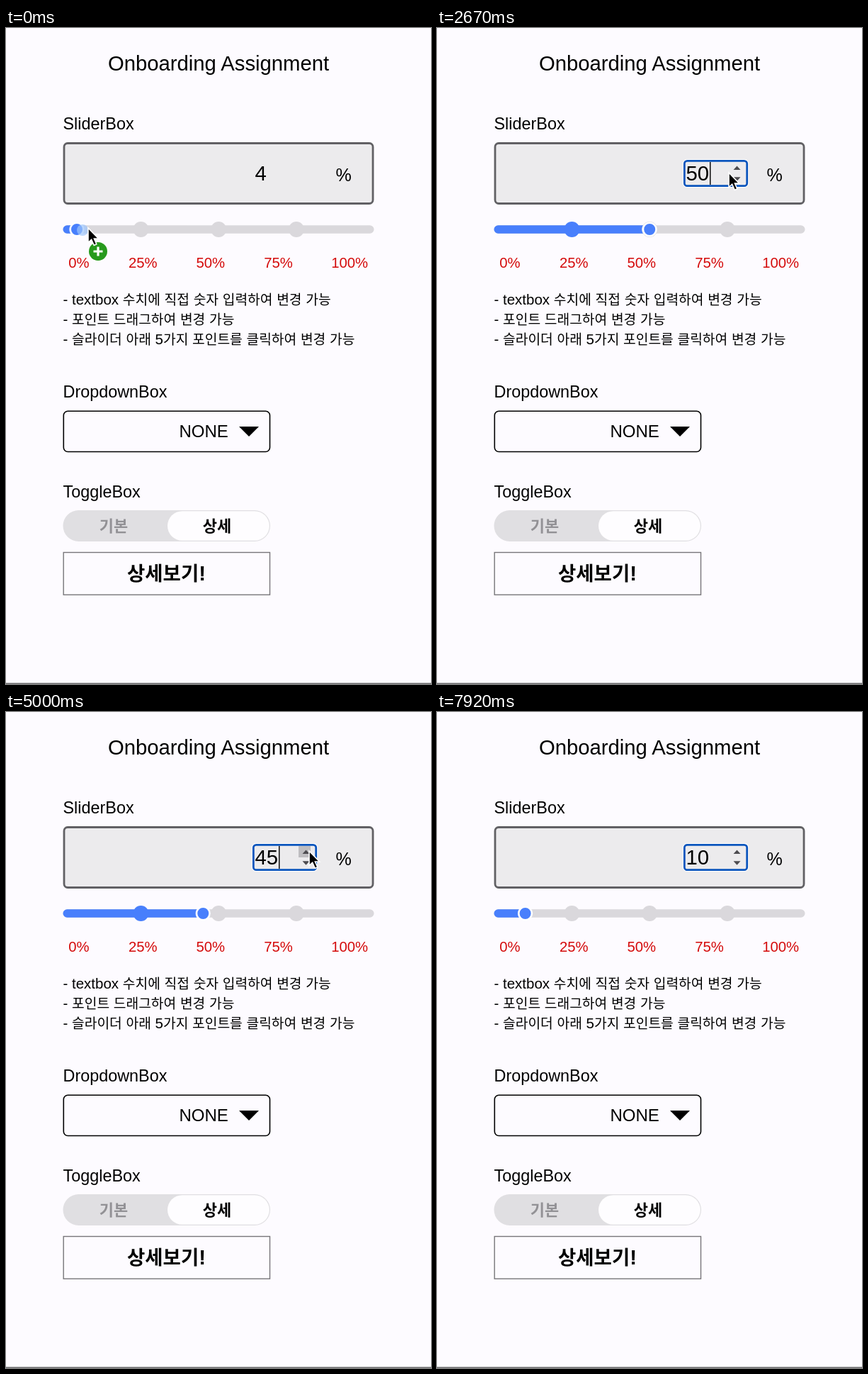
An HTML page that plays this animation: 600 px wide and 925 px high, repeating every 8000 ms.

```html
<!DOCTYPE html>
<html lang="ko">
<head>
<meta charset="utf-8">
<title>Onboarding Assignment</title>
<style>
html, body { margin: 0; width: 100%; height: 100%; overflow: hidden; background: #fdfbff; }
svg { display: block; width: 100vw; height: 100vh; }
text { font-family: "Liberation Sans", Arial, "Noto Sans CJK KR", "Noto Sans CJK", sans-serif; white-space: pre; }
.ko { font-size: .9385em; }
.bold { font-weight: 700; }
.mid { text-anchor: middle; }
</style>
</head>
<body>
<svg viewBox="0 0 600 925">
  <g id="page"></g>

  <g id="focus">
    <rect x="347" y="185" width="93" height="40" rx="6" fill="#fff"/>
    <rect x="349.3" y="187.3" width="88.4" height="35.4" rx="4" fill="#ecebed" stroke="#0b55bd" stroke-width="2.8"/>
    <rect id="press" x="413" width="17" height="16" fill="#bebdc0"/>
    <path d="M418.5 200h10l-5-5.5zM418.5 210.3h10l-5 5.5z" fill="#4d4c50"/>
    <rect id="caret" y="189" width="1.4" height="32" fill="#000"/>
  </g>
  <text id="value" x="351.5" y="215" font-size="29.26"></text>

  <g id="slider">
    <rect x="80.5" y="278.2" width="439" height="11.6" rx="5.8" fill="#dad8dc"/>
    <rect id="bar" x="80.5" y="278.2" height="11.6" rx="5.8" fill="#487ffc"/>
    <g id="dots"></g>
    <circle id="knob" cy="284" r="9.3" fill="#487ffc" stroke="#fff" stroke-width="2.6"/>
  </g>
  <g id="labels"></g>

  <g id="drag">
    <circle cx="-8" cy="3" r="8" fill="#9cc4fb" opacity=".7"/>
    <circle cx="14" cy="34" r="14" fill="#fff" opacity=".75"/>
    <circle cx="14" cy="33" r="13" fill="#279a1d"/>
    <path d="M14 26.5v13M7.5 33h13" stroke="#fff" stroke-width="3.2"/>
  </g>
  <path id="arrow" d="M0 0V20.5L4.6 16.4L8.2 24.4L11.8 22.8L8.4 15H14.6Z" fill="#000" stroke="#fff" stroke-width="1.6"/>
  <g id="hand" fill="#fff" stroke="#000" stroke-width="1.3" stroke-linejoin="round">
    <path d="M-1 .5C.5-1 2.5-.5 3.3 2L5.3 8C5.5 6 8.5 5.8 9 8C10 6.3 12.5 6.6 13 8.8C14 7.6 16.5 8 17 10.5L17.5 15C17.5 18 15.5 20 15.5 24H5.5C5 21 1 18 -2 14.5C-4 12-2 10.5 0 11.5L2 13L-1.8 3.5C-2.2 2-2 1-1 .5Z"/>
    <path d="M7.5 14v6M10.5 14v6M13.5 14v6" fill="none"/>
  </g>
  <g id="beam" fill="none" stroke-linecap="round">
    <path d="M-4-12Q0-12 0-8V9Q0 13-4 13M4-12Q0-12 0-8M0 9Q0 13 4 13M-2.5 4H2.5" stroke="#fff" stroke-width="3"/>
    <path d="M-4-12Q0-12 0-8V9Q0 13-4 13M4-12Q0-12 0-8M0 9Q0 13 4 13M-2.5 4H2.5" stroke="#111" stroke-width="1.3"/>
  </g>
</svg>
<script>
const LOOP = 8000, LEFT = 80.7, UNIT = 4.39;
const el = {};
document.querySelectorAll('[id]').forEach(n => el[n.id] = n);

const text = (x, y, size, str, cls = '', fill = '#000') =>
  `<text x="${x}" y="${y}" font-size="${size}" class="${cls}" fill="${fill}">` +
  str.replace(/[가-힣]+/g, '<tspan class="ko">$&</tspan>') + '</text>';

const notes = [
  '- textbox 수치에 직접 숫자 입력하여 변경 가능',
  '- 포인트 드래그하여 변경 가능',
  '- 슬라이더 아래 5가지 포인트를 클릭하여 변경 가능'
];

el.page.innerHTML =
  '<rect width="600" height="925" fill="#fdfbff"/>' +
  '<rect y="923.5" width="600" height="1.5" fill="#6d6c6f"/>' +
  text(300, 60, 29.26, 'Onboarding Assignment', 'mid') +
  text(80.5, 143, 23.4, 'SliderBox') +
  '<rect x="82" y="162.5" width="436" height="85" rx="5" fill="#ecebed" stroke="#616064" stroke-width="2.8"/>' +
  text(465.5, 216, 25, '%') +
  notes.map((s, i) => text(80.5, 390.3 + i * 27.9, 20.5, s)).join('') +
  text(80.5, 521.3, 23.4, 'DropdownBox') +
  '<rect x="81.3" y="540.3" width="291.2" height="57.2" rx="6" fill="none" stroke="#000" stroke-width="1.6"/>' +
  text(244.5, 577, 24, 'NONE') +
  '<path d="M329 562H357L343 576Z"/>' +
  text(80.5, 662, 23.4, 'ToggleBox') +
  '<rect x="80.5" y="680" width="292.5" height="44" rx="22" fill="#e0dfe2"/>' +
  '<rect x="228" y="681.2" width="143.8" height="41.6" rx="20.8" fill="#fefdff"/>' +
  text(152, 710, 23.4, '기본', 'bold mid', '#929195') +
  text(298, 710, 23.4, '상세', 'bold mid') +
  '<rect x="81.2" y="739.5" width="291.3" height="59.7" fill="none" stroke="#777679" stroke-width="1.4"/>' +
  text(226.5, 778.5, 29.26, '상세보기!', 'bold mid');

el.dots.innerHTML = [25, 50, 75].map(v => `<circle cx="${LEFT + v * UNIT}" cy="284" r="11"/>`).join('');
const dots = [...el.dots.children];

const labelX = [103, 193.2, 288.8, 384.6, 485.2];
el.labels.innerHTML = labelX.map((x, i) => text(x, 338.3, 20.3, i * 25 + '%', 'mid')).join('');
const labels = [...el.labels.children];

// Pointer path: time, x, y
const path = [
  [0, 116, 282], [430, 283, 284], [500, 283, 284], [720, 208, 329], [980, 208, 329],
  [1380, 290, 327], [1820, 290, 327], [2320, 395, 206], [2480, 395, 206],
  [2650, 412, 204], [2720, 412, 204], [2880, 430, 206], [4090, 430, 205], [4250, 430, 205],
  [4420, 428, 196], [5450, 428, 196], [5700, 388, 204], [LOOP, 388, 204]
];
const DRAG_END = 430, FOCUS = 2400, TYPING = 6050;

// Edits: time, field text
const edits = [[880, '25'], [1720, '50'], [FOCUS, '50']];
for (let i = 0; i < 9; i++) edits.push([2950 + i * 135, String(49 - i)]);
for (let i = 0; i < 7; i++) edits.push([4500 + i * 150, String(42 + i)]);
edits.push([TYPING, '4'], [6280, ''], [6840, '1'], [7040, '10'], [7240, '100'], [7590, '10']);

function pointer(t) {
  let i = 1;
  while (path[i][0] < t) i++;
  const [t0, x0, y0] = path[i - 1], [t1, x1, y1] = path[i];
  const p = (t - t0) / (t1 - t0), e = p * p * (3 - 2 * p);
  return [x0 + (x1 - x0) * e, y0 + (y1 - y0) * e];
}

const show = (node, on) => node.setAttribute('display', on ? 'inline' : 'none');

function draw(t) {
  const [x, y] = pointer(t);
  const edit = edits.filter(e => e[0] <= t).pop();
  const dragX = pointer(Math.min(t, DRAG_END))[0];
  const value = edit ? +edit[1] : (dragX - 16 - LEFT) / UNIT;
  const str = edit ? edit[1] : String(Math.floor(value));

  el.value.textContent = str;
  el.bar.setAttribute('width', value * UNIT);
  el.knob.setAttribute('cx', LEFT + value * UNIT);
  dots.forEach((d, i) => d.setAttribute('fill', value > (i + 1) * 25 ? '#487ffc' : '#dad8dc'));

  const focused = t >= FOCUS;
  show(el.focus, focused);
  if (focused) {
    const down = t >= 2930 && t < 4180, up = t >= 4480 && t < 5430;
    show(el.press, down || up);
    el.press.setAttribute('y', down ? 205 : 189);
    show(el.caret, (t - edit[0]) % 640 < 320);
    el.caret.setAttribute('x', 352.5 + str.length * 16.27);
  }

  const hover = labelX.findIndex(c => y > 320 && y < 345 && Math.abs(x - c) < 22);
  labels.forEach((l, i) => l.setAttribute('fill', i === hover ? '#000' : '#d40a0a'));

  const dragging = t < DRAG_END;
  const inField = y > 187 && y < 223 && x > 348 && x < 411;
  const kind = t >= TYPING ? '' : hover >= 0 ? 'hand' : inField ? 'beam' : 'arrow';
  show(el.drag, dragging);
  for (const name of ['arrow', 'hand', 'beam']) show(el[name], name === kind);
  for (const name of ['drag', 'arrow', 'hand', 'beam'])
    el[name].setAttribute('transform', `translate(${x} ${y})`);
}

const start = performance.now();
function tick() {
  draw((performance.now() - start) % LOOP);
  requestAnimationFrame(tick);
}
tick();
</script>
</body>
</html>
```
